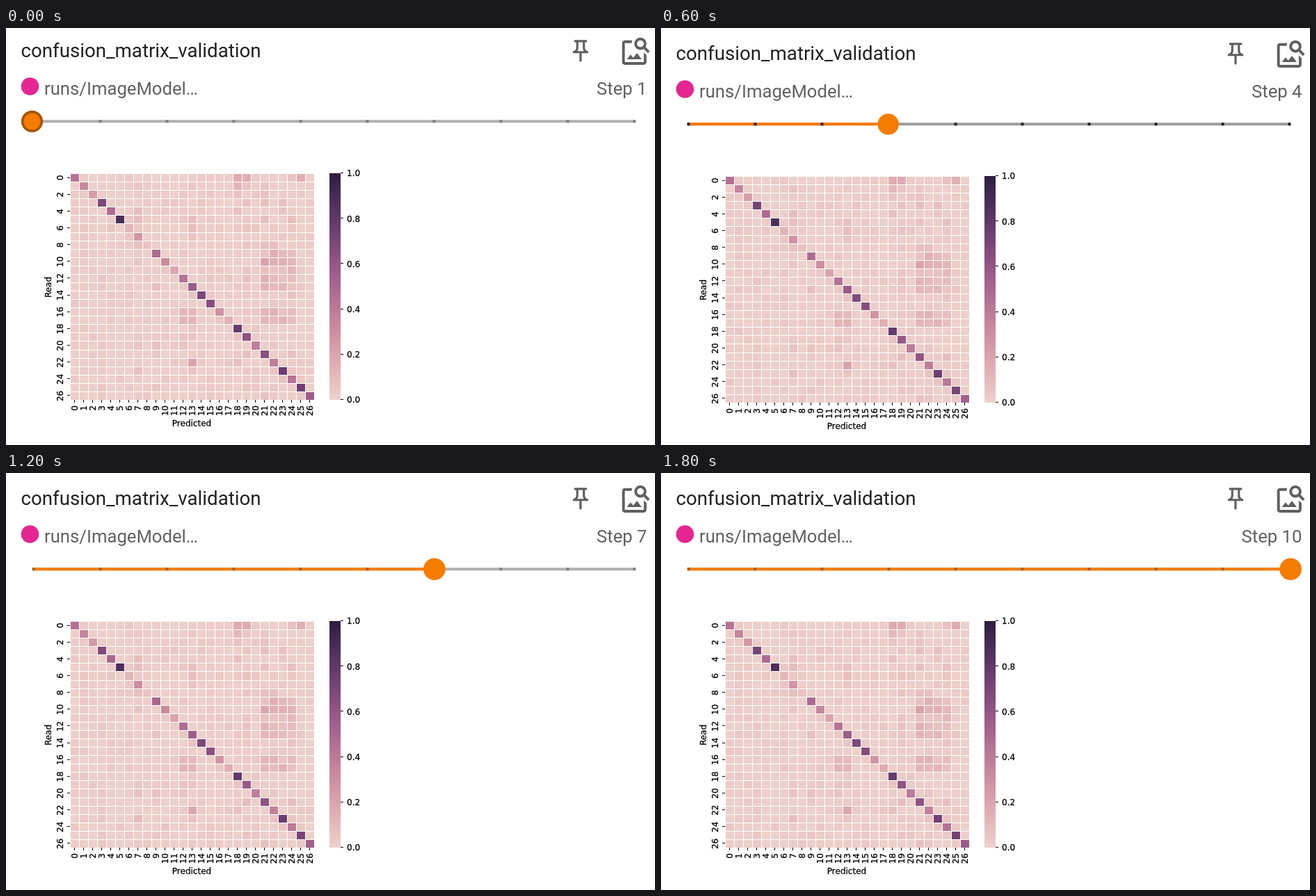
An HTML page for the animation above (2 s loop, 933 by 600 pixels).

```html
<!DOCTYPE html>
<html lang="en">
<head>
<meta charset="utf-8">
<title>Confusion matrix by step</title>
<style>
  html, body { margin: 0; width: 100%; height: 100%; overflow: hidden; background: #fff; }
  svg { display: block; width: 933px; height: 600px; }
  .ui { font-family: Roboto, sans-serif; font-size: 25.7px; fill: #616161; }
  .ui .title { font-size: 27.7px; fill: #212121; }
  .plot { font-family: "DejaVu Sans", sans-serif; font-size: 12px; }
  .plot text { stroke: #000; stroke-width: .25px; }
  .crisp { shape-rendering: crispEdges; }
  .icon { fill: #5f5f5f; fill-rule: evenodd; }
</style>
</head>
<body>
<svg viewBox="0 0 933 600" xmlns="http://www.w3.org/2000/svg">
  <defs><linearGradient id="scale" x1="0" y1="1" x2="0" y2="0"></linearGradient></defs>
  <g id="card">
    <g class="ui">
      <text class="title" x="21.5" y="45.5">confusion_matrix_validation</text>
      <circle cx="34.5" cy="88" r="12.8" fill="#e52592"/>
      <text x="55" y="100">runs/ImageModel…</text>
      <text id="step" x="921.5" y="100" text-anchor="end"></text>
    </g>
    <path class="icon" transform="translate(807 18.2) scale(1.583)" d="M14 4v5c0 1.12.37 2.16 1 3H9c.65-.86 1-1.9 1-3V4h4M17 2H7a1 1 0 0 0 0 2h1v5c0 1.66-1.34 3-3 3v2h5.97v7l1 1 1-1v-7H19v-2c-1.66 0-3-1.34-3-3V4h1a1 1 0 0 0 0-2"/>
    <path class="icon" transform="translate(881.8 14) scale(1.95)" d="M18 13v7H4V6h5.02c.05-.71.22-1.38.48-2H4c-1.1 0-2 .9-2 2v14c0 1.1.9 2 2 2h14c1.1 0 2-.9 2-2v-5zM16.5 18h-11l2.75-3.53 1.96 2.36 2.75-3.54zM19.3 8.89A4.5 4.5 0 1 0 17.88 10.3L21 13.42 22.42 12zM15.5 9a2.5 2.5 0 1 1 0-5 2.5 2.5 0 0 1 0 5z"/>
    <rect id="track" x="38" y="136.3" width="867" height="4"/>
    <rect id="done" x="38" y="136.3" height="4" fill="#f57c00"/>
    <g id="marks"></g>
    <circle id="thumb" cy="138.4" fill="#f57c00" stroke="#a65400"/>
    <g id="plot" class="plot"></g>
  </g>
</svg>
<script>
const $ = id => document.getElementById(id);
const N = 27, LEFT = 93, TOP = 214, CELL_W = 13, CELL_H = 326 / N;
const STEPS = 10, STEP_MS = 200;

// Share of correct predictions per class.
const recall = [.43, .33, .24, .7, .48, .87, .12, .28, .06, .5, .32, .19, .45, .57,
  .67, .65, .28, .16, .78, .6, .39, .63, .37, .76, .43, .73, .55];

const noise = (a, b, c = 0) => {
  const s = Math.sin(a * 127.1 + b * 311.7 + c * 74.7) * 43758.5453;
  return s - Math.floor(s);
};
const within = (v, lo, hi) => v >= lo && v <= hi;

// Similar classes form blocks of confusion; elsewhere a faint random haze.
function confusion(r, c) {
  const tail = within(c, 21, 24), pair = within(c, 12, 13), twins = within(c, 18, 19);
  if (r === 0 && (twins || c === 25)) return .16;
  if (r === 22 && c === 13 || r === 10 && c === 21) return .2;
  const mixed = tail && (within(r, 9, 13) || within(r, 16, 17))
    || pair && within(r, 16, 17) || twins && r === 1;
  if (mixed) return .05 + .1 * noise(r, c);
  const busy = tail || pair || twins || c === 7 || c === 9;
  return .005 + noise(r, c) ** 3 * (busy ? .08 : .04);
}

function cellValue(r, c, step) {
  const drift = noise(r, c, step + 1) - .5;
  const base = r === c ? recall[r] : confusion(r, c);
  return base + drift * Math.min(.05, base * .15);
}

// Cubehelix ramp running from light pink to dark purple.
function ramp(v) {
  const x = .85 - .7 * v;
  const amp = .4 * x * (1 - x), phi = .8 * Math.PI * x;
  const cos = Math.cos(phi), sin = Math.sin(phi);
  const rgb = [-.14861 * cos + 1.78277 * sin, -.29227 * cos - .90649 * sin, 1.97294 * cos];
  return `rgb(${rgb.map(k => Math.round(255 * (x + amp * k))).join()})`;
}

const set = (el, attrs) => { for (const k in attrs) el.setAttribute(k, attrs[k]); };
function add(parent, tag, attrs, text = "") {
  const el = document.createElementNS("http://www.w3.org/2000/svg", tag);
  set(el, attrs);
  el.textContent = text;
  parent.append(el);
  return el;
}
const plot = $("plot");
const box = (x, y, width, height, fill = "#000") =>
  add(plot, "rect", { x, y, width, height, fill, class: "crisp" });
const label = (text, x, y, anchor = "start", turned = true) =>
  add(plot, "text", {
    transform: `translate(${x} ${y})${turned ? " rotate(-90)" : ""}`, "text-anchor": anchor
  }, text);

const cells = [];
const rowY = r => Math.round(TOP + r * CELL_H);
for (let r = 0; r < N; r++)
  for (let c = 0; c < N; c++) {
    const y = rowY(r);
    cells.push({ r, c, el: box(LEFT + c * CELL_W, y, CELL_W - 1, rowY(r + 1) - y - 1) });
  }

for (let i = 0; i < N; i++) {
  const x = LEFT + (i + .5) * CELL_W, y = TOP + (i + .5) * CELL_H;
  box(Math.floor(x) - 1, 539, 1, 4);
  label(i, x + 3.2, 547, "end");
  if (i % 2 === 0) {
    box(88, Math.floor(y) - 1, 4, 1);
    label(i, 81.5, y - .5, "middle");
  }
}
label("Predicted", 267, 577, "middle", false);
label("Read", 65, 377, "middle");

for (let v = 0; v <= 1; v += 1 / 32)
  add($("scale"), "stop", { offset: v, "stop-color": ramp(v) });
box(465, 213, 16, 326, "url(#scale)");
for (let i = 0; i <= 5; i++) {
  const y = 539 - i * 65.2;
  box(481, Math.round(y) - 1, 4, 1);
  label((i / 5).toFixed(1), 490, y + 4.3, "start", false);
}

for (let i = 0; i < STEPS; i++)
  add($("marks"), "rect", { x: 37.5 + i * 96, y: 136.3, width: 4, height: 4 });

// The slider darkens and its thumb shrinks a little while pressed.
const released = new Set([0, 6, 7, 9]);

function show(step) {
  const first = step === 0, up = released.has(step), x = 37.5 + step * 96.4;
  set($("card"), { transform: `translate(0 ${first ? -4 : 0})` });
  $("step").textContent = "Step " + (step + 1);
  set($("track"), { fill: up ? "#b0b0b0" : "#9c9c9c" });
  set($("done"), { width: Math.max(0, x - 38) });
  set($("marks"), { "fill-opacity": up ? .3 : .8 });
  set($("thumb"), { cx: x, r: first ? 13.8 : up ? 15.8 : 15.2, "stroke-width": first ? 3.6 : 0 });
  for (const { r, c, el } of cells) el.setAttribute("fill", ramp(cellValue(r, c, step)));
}

const start = performance.now();
let shown = -1;
function tick() {
  const step = Math.floor((performance.now() - start) / STEP_MS) % STEPS;
  if (step !== shown) show(shown = step);
  requestAnimationFrame(tick);
}
tick();
</script>
</body>
</html>
```
